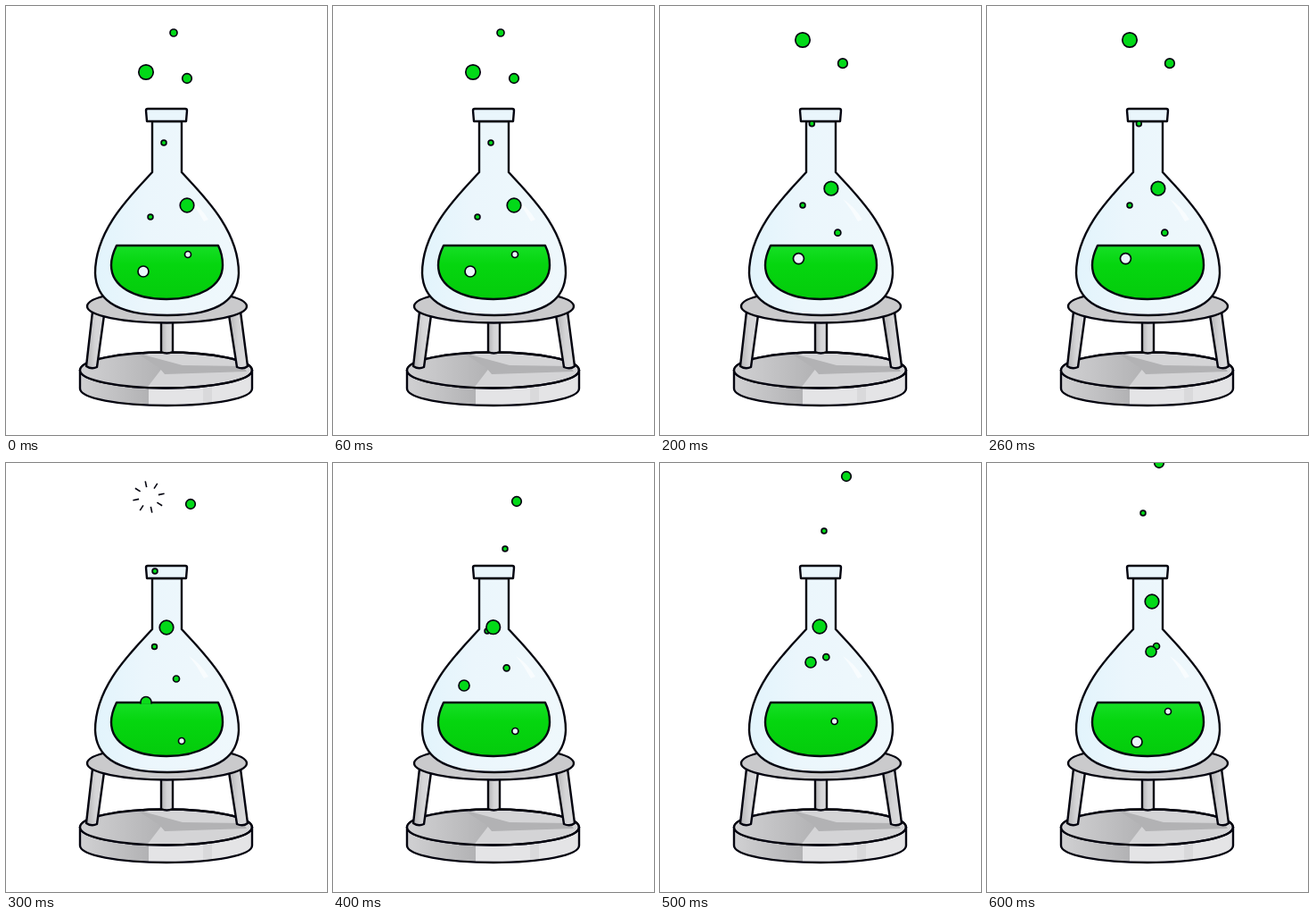
These frames come from a looping animation (360 px wide and 480 px high, 0.7 s). An HTML page:

```html
<!DOCTYPE html>
<html lang="en">
<head>
<meta charset="utf-8">
<title>Bubbling flask</title>
<style>
  html, body { margin: 0; width: 100%; height: 100%; overflow: hidden; background: #fff; }
  svg { display: block; width: 360px; height: 480px; }
</style>
</head>
<body>
<svg viewBox="0 0 360 480" stroke="#050510" stroke-width="2.400" stroke-linejoin="round">
  <defs>
    <linearGradient id="glass">
      <stop offset="0" stop-color="#e2f4fc"/>
      <stop offset=".35" stop-color="#ebf6fc"/>
      <stop offset="1" stop-color="#eff8fc"/>
    </linearGradient>
    <linearGradient id="liquid" x2="0" y2="1">
      <stop offset="0" stop-color="#16df26"/>
      <stop offset=".35" stop-color="#05d60f"/>
      <stop offset="1" stop-color="#04cb0c"/>
    </linearGradient>
    <linearGradient id="metal">
      <stop offset="0" stop-color="#b4b4b6"/>
      <stop offset=".5" stop-color="#d4d4d6"/>
      <stop offset="1" stop-color="#dcdcde"/>
    </linearGradient>
    <linearGradient id="shade">
      <stop offset="0" stop-color="#d2d2d4"/>
      <stop offset="1" stop-color="#b2b2b4"/>
    </linearGradient>
    <ellipse id="face" cx="179.500" cy="407.500" rx="96.500" ry="20"/>
    <path id="rim" d="M83 407V428C83 439 126 447 180 447S276 439 276 428V407"/>
    <clipPath id="top"><use href="#face"/></clipPath>
    <clipPath id="side"><use href="#rim"/></clipPath>
  </defs>

  <!-- base -->
  <g clip-path="url(#side)" stroke="none">
    <path d="M80 400H160V450H80Z" fill="url(#shade)"/>
    <path d="M160 400H280V450H160Z" fill="#e4e4e6"/>
    <path d="M221 400h10v50h-10Z" fill="#d9d9db"/>
  </g>
  <use href="#rim" fill="none"/>
  <use href="#face" fill="#d4d4d6"/>
  <g clip-path="url(#top)" stroke="none">
    <path d="M80 385H146L176 404L156 430H80Z" fill="url(#shade)"/>
    <path d="M146 388L198 402L266 403L270 409L178 412L172 405Z" fill="#b2b2b4"/>
  </g>
  <use href="#face" fill="none"/>

  <!-- legs and plate -->
  <g fill="url(#metal)">
    <path d="M174 352V387Q180 390 187 387V352Z"/>
    <path d="M97 342L90 403Q96 407 102 404L110 346Z"/>
    <path d="M250 346L259 404Q266 407 271 403L263 342Z"/>
  </g>
  <ellipse cx="180.500" cy="336" rx="89.500" ry="18.500" fill="#cacacc"/>

  <!-- flask -->
  <path d="M164 129V186C140 212 100 250 100 299C101 325 118 346 181 346S260 325 261 299C261 250 221 212 197 186V129Z" fill="url(#glass)"/>
  <path d="M159 115H201Q203 115 203 117L202 129H158L157 117Q157 115 159 115Z" fill="#eaf6fc"/>
  <path d="M205 216Q218 224 227 239L222 241Q215 228 205 216Z" fill="#fff" opacity=".6" stroke="none"/>
  <path d="M124 268H238C241 274 243 281 243 290C243 314 216 328 180 328S118 314 118 290C118 281 121 274 124 268Z" fill="url(#liquid)"/>

  <g id="bubbles"></g>
</svg>
<script>
const SURFACE = 268, STEPS = 7, STEP_MS = 100;
const layer = document.getElementById('bubbles');

// A bubble drifts through keys [age, x, y]; ease > 1 speeds up each leg, sway zigzags sideways.
const tracks = [
  { start: 0, r: 2.9, keys: [[0, 162, 236], [2, 160, 223], [4, 173, 188]] },
  { start: 0, r: 2.9, keys: [[0, 177, 153], [3, 167, 121], [4, 193, 96], [6, 175, 56]] },
  { start: 0, r: 4, burst: 10, keys: [[0, 188, 30]] },
  { start: 3, r: 3.5, sway: -4, keys: [[0, 201, 311], [3, 199, 278]] },
  { start: 0, r: 3.5, sway: 3, keys: [[0, 201, 278], [6, 187, 205]] },
  { start: 0, r: 5.3, ease: 1.8, keys: [[0, 203, 81], [3, 207, 46], [4, 206, 43], [5, 209, 15], [6, 193, 0]] },
  { start: 6, r: 6, ease: 1.8, keys: [[0, 168, 312], [1, 154, 297], [4, 157, 267], [5, 147, 249], [6, 169, 223], [7, 184, 211]] },
  { start: 0, r: 7.8, ease: 1.8, keys: [[0, 203, 223], [3, 180, 184], [5, 179, 183], [6, 185, 155]] },
  { start: 0, r: 8.2, burst: 18, keys: [[0, 157, 74], [1, 153, 64], [2, 160, 38]] }
];

function position({ keys, ease = 1, sway = 0 }, age) {
  const n = Math.max(1, keys.findIndex(k => k[0] >= age));
  const [a, x0, y0] = keys[n - 1], [b, x1, y1] = keys[n] || keys[n - 1];
  const t = b > a ? ((age - a) / (b - a)) ** ease : 0;
  return [x0 + (x1 - x0) * t + sway * Math.cos(Math.PI * age), y0 + (y1 - y0) * t];
}

function bubble([x, y], r) {
  if (Math.abs(y - SURFACE) < 3) {
    const base = SURFACE + 1.5;
    return `<path d="M${x - r} ${base}v-2a${r} ${r} 0 0 1 ${2 * r} 0v2" fill="#0bdc1a" stroke-width="1.6"/>`;
  }
  const fill = y > SURFACE ? '#eaf7fc' : '#02d918';
  return `<circle cx="${x}" cy="${y}" r="${r}" fill="${fill}" stroke-width="1.7"/>`;
}

function burst([x, y], size, rays = 8) {
  let d = '';
  for (let k = 0; k < rays; k++) {
    const a = (k + 0.73) / rays * 2 * Math.PI, c = size * Math.cos(a), s = size * Math.sin(a);
    d += `M${x + 0.62 * c} ${y + 0.62 * s}L${x + c} ${y + s}`;
  }
  return `<path d="${d}" stroke-width="1.6"/>`;
}

function draw(step) {
  let out = '';
  for (const track of tracks) {
    const life = track.keys.at(-1)[0];
    let age = (step - track.start + STEPS) % STEPS;
    for (; age <= life; age += STEPS) out += bubble(position(track, age), track.r);
    if (track.burst && age === life + 1) out += burst(position(track, life), track.burst);
  }
  layer.innerHTML = out;
}

let shown = -1;
function tick() {
  const step = Math.floor(performance.now() / STEP_MS) % STEPS;
  if (step !== shown) draw(shown = step);
  requestAnimationFrame(tick);
}
tick();
</script>
</body>
</html>
```
